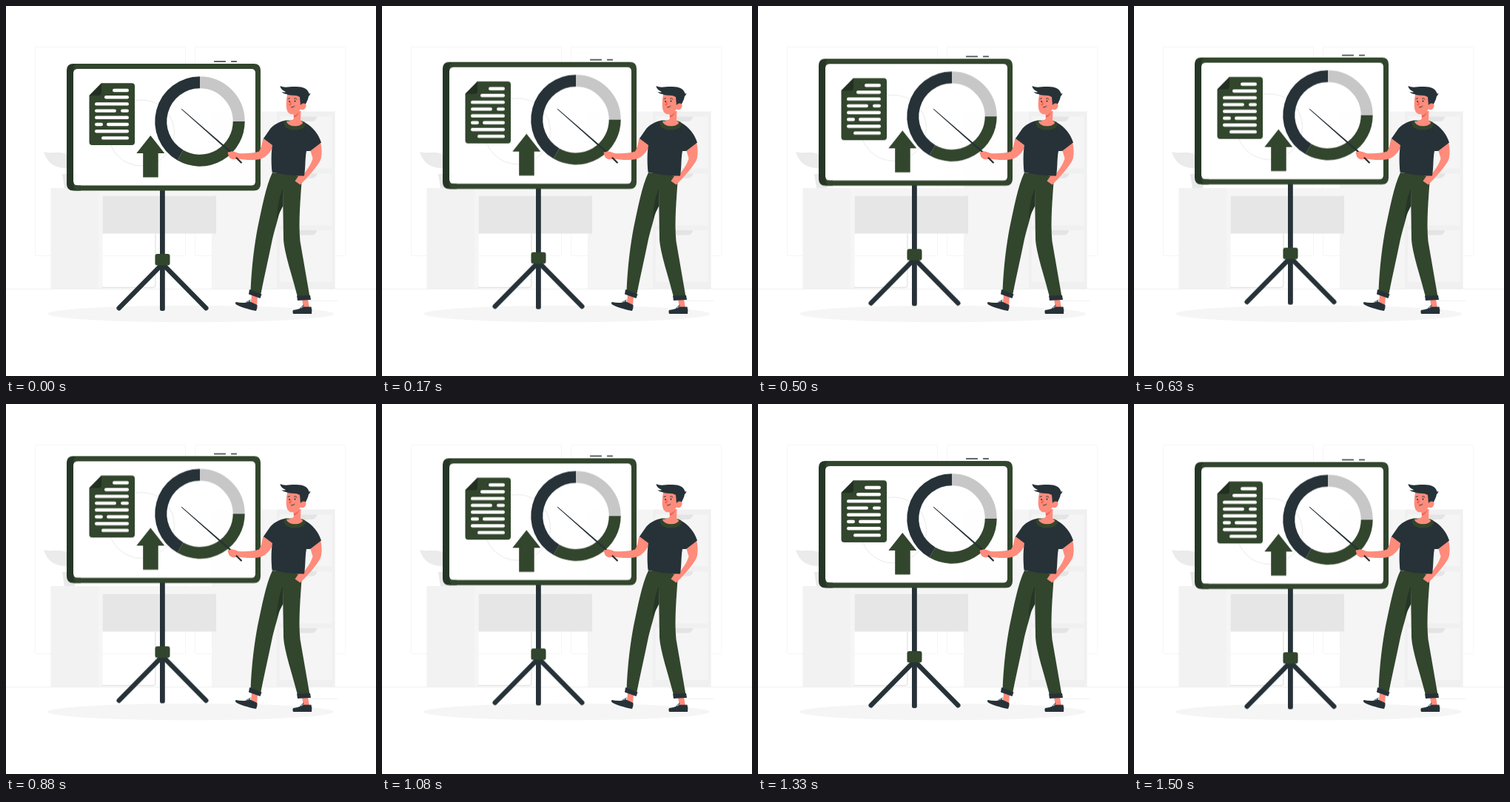
Write an HTML page that moves like this. It is 500 px wide and 500 px high and loops after 1.54 s.

```html
<!DOCTYPE html>
<html lang="en">
<head>
<meta charset="utf-8">
<title>Presentation</title>
<style>
  html, body { margin: 0; width: 100%; height: 100%; overflow: hidden; background: #fff; }
  svg { display: block; width: 100vw; height: 100vh; }
  .dark { fill: #263238; }
  .green { fill: #32452d; }
  .skin { fill: #ff8b7b; }
  .line { fill: none; stroke: #263238; stroke-linecap: round; }
</style>
</head>
<body>
<svg viewBox="0 0 500 500">
  <g id="room">
    <g fill="none" stroke="#f6f6f6">
      <path d="M39.5 55.5H242.5V337.5H39.5ZM255.5 55.5H458.5V337.5H255.5Z"/>
      <path d="M0 382.5H500M412 398.5H448" stroke="#f0f0f0"/>
    </g>
    <ellipse cx="249.500" cy="416" rx="193.500" ry="11.300" fill="#f5f5f5"/>
    <path d="M51 197C60 200 70 196 82 200V219C68 219 56 214 51 197Z" fill="#ebebeb"/>
    <path d="M76 227H96L93 246H79Z" fill="#e9e9e9"/>
    <path d="M278 142.500H367V382H278Z" fill="#f5f5f5"/>
    <path d="M366 142.500H444.500V382H366Z" fill="#f0f0f0"/>
    <g id="drawers"></g>
    <path d="M60.500 246H125V382H60.500Z" fill="#f2f2f2"/>
    <path d="M125 246H366V256H130.500V382H125Z" fill="#f5f5f5"/>
    <path d="M130.500 256.500H284V307.500H130.500Z" fill="#e6e6e6"/>
    <path d="M130 380.500H198Q202 380.500 202 376V308" fill="none" stroke="#e3e3e3" stroke-width="1.300"/>
  </g>

  <g id="board">
    <path class="line" d="M281.500 75H296.500M304.500 75H311.500" stroke-width="1.300" stroke-linecap="butt"/>
    <rect class="dark" x="208" y="246" width="6.800" height="166" rx="2.500"/>
    <path class="line" d="M210 350L152.700 408.300M213 350L270.300 408.300" stroke-width="6.500"/>
    <rect class="green" x="201.500" y="335" width="20" height="15.500" rx="3"/>
    <rect x="91" y="84" width="246" height="159" rx="5" fill="#fff" fill-opacity=".85"/>
    <circle cx="183" cy="171.500" r="44.500" fill="none" stroke="#e8e8e8"/>
    <path fill="#263626" d="M91 78H101V249.500H91Q82 249.500 82 240.500V87Q82 78 91 78ZM91 90V237Q91 242.500 97 242.500H101V85H97Q91 85 91 90Z"/>
    <path class="green" fill-rule="evenodd" d="M94 78H335Q344 78 344 87V240.500Q344 249.500 335 249.500H94Q85 249.500 85 240.500V87Q85 78 94 78ZM96.500 85Q91 85 91 90.500V237Q91 242.500 96.500 242.500H331.500Q337 242.500 337 237V90.500Q337 85 331.500 85Z"/>
    <path fill="#263626" d="M94 78.800Q82.500 79 82.500 88V240Q83 248 94 248.700Q91 246 91 240V87Q91 81 94 78.800Z"/>
    <path class="green" d="M129 104.300H170Q174 104.300 174 108.300V184Q174 188 170 188H116.500Q112.500 188 112.500 184V121Z"/>
    <path fill="#223021" d="M129 104.300V117Q129 121 125 121H112.500Z"/>
    <g id="rows" stroke="#fff" stroke-width="4.400" stroke-linecap="round"></g>
    <path class="green" d="M195.300 175L214.300 199H205.700V231.500H185.200V199H176.300Z"/>
    <g id="donut" fill="none" stroke-width="16"></g>
  </g>

  <g id="presenter">
    <path class="skin" d="M332 390L340 393L339 405L331 401ZM400 396H408L410 408H402Z"/>
    <path class="dark" d="M310.500 400C317 401 324 402 329 399L331 400L339.500 404Q340 408 338 412C327 410 315 406 310.500 403Q309.500 401 310.500 400ZM388 411C394 410.500 399 408.500 402 406.500L412.500 406.500Q414 411 413 416H388Q386.500 413 388 411Z"/>
    <path class="line" d="M325 400L329 398M328 402L330 397M397 409L401 405M400 410L402 404" stroke-width=".8"/>
    <path class="green" d="M374 227L400 230C398 262 395 290 397.500 318L410.500 393H394C387 365 376 334 375 315L374 248Z"/>
    <path class="green" d="M360 225L386 228C382 240 376 247 374 252C372 276 364 298 360 315C355 340 349 365 344 391L330.500 385C332 350 336 321 340 300C346 272 351 244 360 225Z"/>
    <path fill="#263626" d="M374 247L374.500 270C371 277 367 284 366 290C366 274 369 258 374 247Z"/>
    <path class="dark" d="M329 383L345.500 389.500L343.500 395L328 389.500ZM393 391.500L411 391L412 397L394 398Z"/>

    <path class="skin" d="M411 194L425 184C427.500 195 427 205 424 210C418 220 411 227 406 233L397.500 241.500L390.500 236.500L395 230L402 227.500C408 220 413 212 414.500 206Z"/>
    <path class="skin" d="M348 178L362 187C358 197 352 204 345 206.500C335 209 323 208 312 206.500C307 208.500 302 206 301 203L299.500 198L303 196.500L309 197L314 199C325 199.500 335 199 342 196.500C346 191 346 183 348 178Z"/>
    <path class="dark" d="M376 155C368 157 361 161 357 166L348 179L360 188C358 200 358.500 214 359.500 224.500Q382 230 403 229.500C405 217 404 206 406 196H411L426 184.500C422 172 414 163 404 157.500Z"/>
    <path class="green" d="M377 154.500C373 160 378 167.500 390 167.500C401 167.500 407 162 404 157L399 155Z"/>
    <path class="skin" d="M388 142H398.500L398 155Q401 156 401 158C398 164 381 164 379 156Q387 155 389 152Z"/>
    <path class="skin" d="M380 119C379 126 378 134 379.500 140C381 147 390 149 396 142L398 139.500C402 142 406 138 405.500 134C405 130 400 130 398.500 133L398 120Z"/>
    <path fill="#e9685b" d="M389 148Q394 147 396 142Q395 149 389 151Z"/>
    <path class="dark" d="M370.500 108C376 111 382 109 390 109C400 108.500 408 111 409.500 118.500Q411 118.500 411.500 117.500Q411 121 409 122C408 127 406 130 405 132.500Q401 130 398 134L397 123C392 119.500 386 122 380 119.500Q375 119 372 116Q376 117 378 116C374 114 371 112 370.500 108Z"/>
    <ellipse class="dark" cx="383" cy="129" rx=".8" ry="1.200"/>
    <ellipse class="dark" cx="390.500" cy="128.500" rx=".8" ry="1.200"/>
    <path class="line" d="M381 125.500L383.500 124.800M389.500 125Q391.500 124 393 126M385.500 136.800Q388.500 137.500 390 135.200" stroke-width=".9"/>
    <path fill="#f4624f" d="M385.500 128L382 133.800Q384 135 385.500 134Z"/>
    <path class="dark" d="M237.300 138.800L302 194.600L319.200 211.300L317.800 212.900L300.500 196.300L236.800 139.500Z"/>
    <path class="skin" d="M300 198Q306 195 310 198L314 201L309 207Q303 207 301.500 203Z"/>
  </g>
</svg>
<script>
const NS = "http://www.w3.org/2000/svg";
const add = (id, tag, attrs) => {
  const el = document.createElementNS(NS, tag);
  for (const key in attrs) el.setAttribute(key, attrs[key]);
  document.getElementById(id).append(el);
};

for (let i = 0; i < 3; i++) {
  const y = 149.500 + i * 76.700;
  add("drawers", "path", { d: `M370 ${y}h70.500v70h-70.500z`, fill: "#f5f5f5" });
  add("drawers", "path", { d: `M396 ${y}h24.500q-2 6.500-7 6.500h-17.500z`, fill: "#e4e4e4" });
}

// Text lines of the document, as start and end pairs per row
const rows = [
  [144, 166], [133, 166], [120, 166], [120, 149, 155, 166],
  [120, 166], [120, 131, 136, 166], [120, 166], [129, 166]
];
rows.forEach((row, i) => {
  const y = 114 + i * 9.200;
  for (let k = 0; k < row.length; k += 2)
    add("rows", "path", { d: `M${row[k] + 2.200} ${y}H${row[k + 1] - 2.200}` });
});

const point = deg => {
  const a = (deg - 90) * Math.PI / 180;
  return `${262 + 52.700 * Math.cos(a)} ${156 + 52.700 * Math.sin(a)}`;
};
[[0, 90, "#c7c7c7"], [90, 210, "#32452d"], [210, 360, "#263238"]].forEach(([from, to, stroke]) =>
  add("donut", "path", { d: `M${point(from)}A52.700 52.700 0 0 1 ${point(to)}`, stroke }));

// Time in ms and vertical shift of the board
const loop = 1540;
const steps = [[0, 0], [330, -4.500], [715, -9.500], [880, -7.600], [1080, -4.700], [1330, -1.100], [1500, .4], [loop, .4]];
document.getElementById("board").animate(
  steps.map(([t, y]) => ({ offset: t / loop, transform: `translateY(${y}px)` })),
  { duration: loop, iterations: Infinity }
);
</script>
</body>
</html>
```
